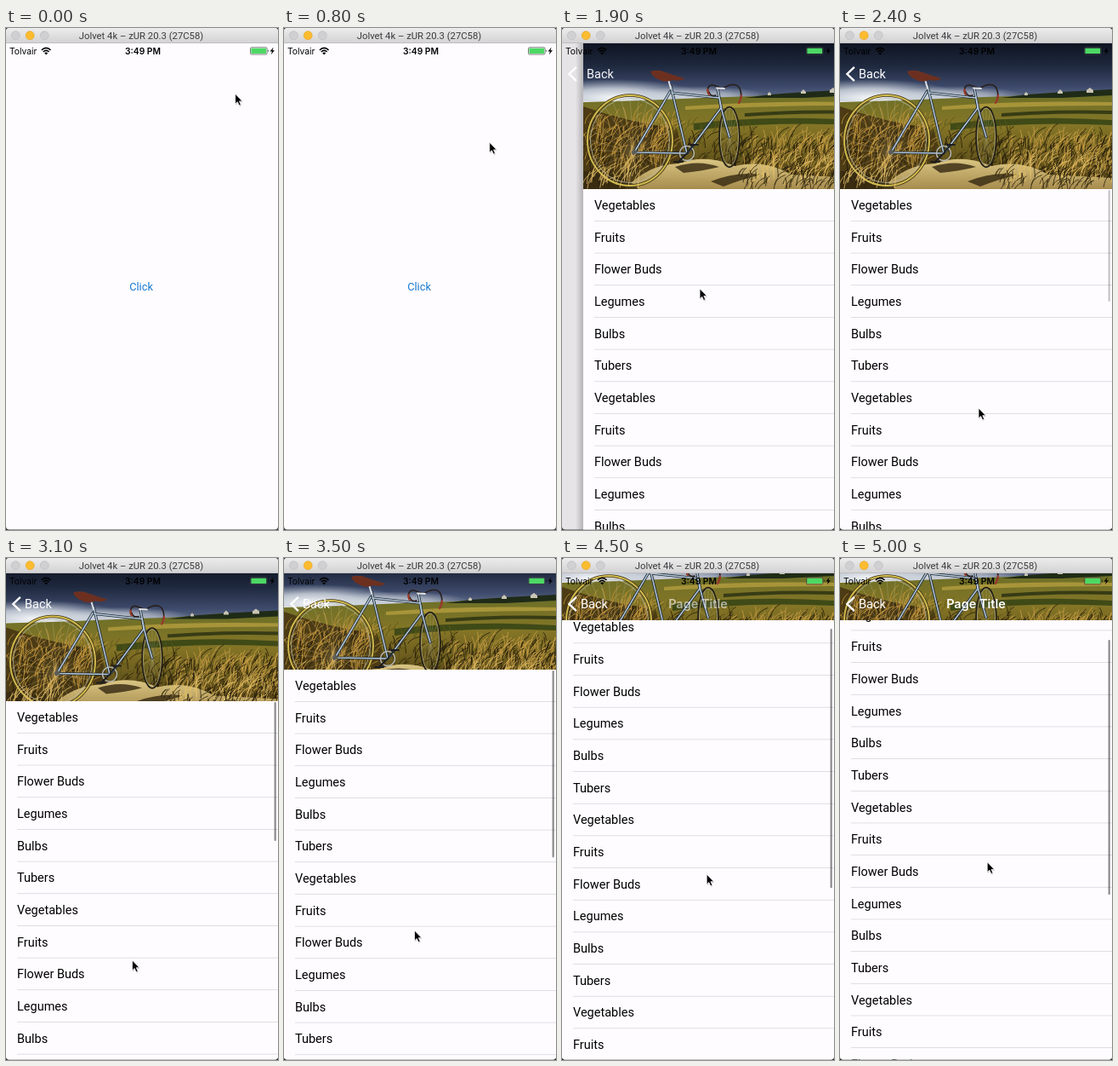
Write an HTML page that moves like this. It is 320 px wide and 589 px high and loops after 5100 ms.

```html
<!DOCTYPE html>
<html lang="en">
<head>
<meta charset="utf-8">
<title>Scrolling header</title>
<style>
  html, body { margin: 0; width: 100%; height: 100%; overflow: hidden; background: #3a393c; }
  svg { display: block; }
  text { font-family: Roboto, sans-serif; font-size: 14.5px; }
  .bar { font-family: Inter, sans-serif; font-size: 10.3px; }
  .bold { font-family: Inter, sans-serif; font-weight: 600; }
  .mid { text-anchor: middle; }
  .line { fill: none; stroke-linecap: round; stroke-linejoin: round; }
</style>
</head>
<body>
<svg id="stage" width="320" height="589" viewBox="0 0 320 589">
  <defs>
    <linearGradient id="chrome" x2="0" y2="1"><stop stop-color="#ececec"/><stop offset="1" stop-color="#d2d1d3"/></linearGradient>
    <linearGradient id="edge"><stop stop-color="#000" stop-opacity="0"/><stop offset="1" stop-color="#000" stop-opacity=".22"/></linearGradient>
    <linearGradient id="sky" x2="0" y2="1"><stop stop-color="#0e1421"/><stop offset=".4" stop-color="#1f293f"/><stop offset=".75" stop-color="#3d496a"/><stop offset="1" stop-color="#65718f"/></linearGradient>
    <radialGradient id="glow"><stop stop-color="#f6f8fa"/><stop offset=".5" stop-color="#dfe5ea" stop-opacity=".75"/><stop offset="1" stop-color="#c3ced8" stop-opacity="0"/></radialGradient>
    <linearGradient id="field" x2="0" y2="1"><stop stop-color="#6b6f28"/><stop offset=".35" stop-color="#847526"/><stop offset="1" stop-color="#4a3813"/></linearGradient>
    <linearGradient id="stone" x2="0" y2="1"><stop stop-color="#dac583"/><stop offset="1" stop-color="#a58a4c"/></linearGradient>
    <clipPath id="window"><rect width="320" height="588.4" rx="4"/></clipPath>
  </defs>
  <g clip-path="url(#window)">
    <rect width="320" height="589" fill="#fefcff"/>
    <g id="home">
      <text id="click" class="mid" x="159" y="307.7" fill="#1679d0" style="font-size:12.8px">Click</text>
    </g>
    <rect id="dim" y="18" width="320" height="571" opacity="0"/>
    <g id="page">
      <rect x="-9" y="18" width="9" height="571" fill="url(#edge)"/>
      <rect y="18" width="320" height="571" fill="#fefcff"/>
      <g id="list"></g>
      <svg id="header" y="18" width="320" height="171" overflow="hidden">
        <g id="photo">
          <rect y="18" width="320" height="68" fill="url(#sky)"/>
          <ellipse cx="35" cy="82" rx="110" ry="22" fill="url(#glow)"/>
          <ellipse cx="135" cy="81" rx="85" ry="13" fill="url(#glow)" opacity=".7"/>
          <path d="M0 87L70 85L140 82L200 80L250 76L320 74V190H0Z" fill="url(#field)"/>
          <path d="M190 82L220 78L262 75L320 72V79L260 82Z" fill="#1f2b17"/>
          <path d="M217 77l2-2 2 2v2h-4zM256 75l3-3 3 3v2h-6zM290 73l4-3 4 3v3h-8z" fill="#c9c5b4"/>
          <path d="M120 92Q210 85 320 87V91Q210 91 120 96Z" fill="#a8953a"/>
          <path d="M190 100Q260 95 320 97V101Q260 99 190 104Z" fill="#373c14"/>
          <path d="M130 112Q220 102 320 108V114Q220 109 130 120Z" fill="#3f4a17"/>
          <path d="M0 92Q50 110 110 118L130 190H0Z" fill="#4c3b14"/>
          <g id="backGrass"></g>
          <path d="M48 190Q75 160 112 159Q145 147 178 162Q215 154 245 172L320 176V190Z" fill="url(#stone)"/>
          <path d="M0 190V168Q24 166 48 178Q60 182 66 190ZM108 163Q135 154 160 163Q140 168 118 170ZM150 180Q180 168 210 172Q185 178 165 186Z" fill="#352811" opacity=".8"/>
          <g class="line">
            <ellipse cx="55" cy="132" rx="50" ry="53" stroke="#3c3315" stroke-width="3.6"/>
            <ellipse cx="55" cy="132" rx="50" ry="53" stroke="#d3bb4e" stroke-width="1.9"/>
            <ellipse cx="55" cy="132" rx="46.5" ry="49.5" stroke="#bcbba8" stroke-width=".8"/>
            <ellipse cx="172" cy="128" rx="11.5" ry="35" stroke="#211d15" stroke-width="2.4"/>
            <ellipse cx="172" cy="128" rx="10.5" ry="34" stroke="#b9ad74" stroke-width=".9"/>
            <path id="spokes" stroke="#e3dfc7" stroke-width=".35" opacity=".55"/>
            <g id="frame">
              <path d="M102 75L60 146L122 147L103 68M104 76L160 82L162 94L124 145M158 71L163 96Q167 112 172 128"/>
            </g>
            <path d="M100 60L103 71" stroke="#d9dde1" stroke-width="2"/>
            <path d="M147 77Q145 66 153 67L164 71Q177 63 183 69Q188 76 184 87M148 75Q150 81 156 79" stroke="#29201f" stroke-width="1.7"/>
            <path d="M146.5 72Q146 76 148 78M186 79Q186 84 183 88" stroke="#9c3a2a" stroke-width="2.2"/>
            <path d="M157 70.5L166 71" stroke="#dfe3e6" stroke-width="1.8"/>
            <circle cx="122" cy="147" r="8.5" stroke="#b5b8b6" stroke-width="1.5"/>
            <path d="M122 147L112 157M107 157H117M122 147L130 137M126 137H135" stroke="#1c1e20" stroke-width="1.8"/>
            <circle cx="60" cy="146" r="3" fill="#5c5d58"/>
          </g>
          <path d="M79 51Q88 48 97 52Q108 56 119 59Q115 63 105 61Q96 65 88 60Q81 57 79 51Z" fill="#6d3020"/>
          <g id="frontGrass"></g>
        </g>
      </svg>
    </g>

    <g id="status">
      <text class="bar" x="4" y="30.7">Tolvair</text>
      <g class="line" stroke="#000" stroke-width="1.6" style="stroke-linecap:butt">
        <path d="M41.9 25.8Q47.2 20.8 52.5 25.8M43.8 28Q47.2 24.9 50.6 28"/>
      </g>
      <path d="M45.2 29.2Q47.2 27.6 49.2 29.2L47.2 31.4Z"/>
      <text class="bar bold mid" x="161" y="30.7">3:49 PM</text>
      <rect x="287.5" y="22.8" width="19.6" height="8.2" rx="1.4" fill="none" stroke="#444" stroke-width=".7"/>
      <rect x="288.4" y="23.7" width="17.8" height="6.4" rx=".7" fill="#4cd964"/>
      <path d="M308 25.3Q309.4 26.9 308 28.5Z"/>
      <path d="M314.6 22.6L310.6 27.5H313L311.8 31.2L316 26.2H313.5Z"/>
    </g>

    <g id="back" opacity="0">
      <path class="line" d="M16 46.7L8.4 54L16 61.3" stroke="#fff" stroke-width="2.4" style="stroke-linecap:square;stroke-linejoin:miter"/>
      <text id="backText" x="22" y="59.2" fill="#fff">Back</text>
    </g>
    <text id="pageTitle" class="bold mid" x="160" y="59.2" fill="#fff" opacity="0">Page Title</text>
    <rect id="thumb" x="315.6" width="2.2" rx="1.1" opacity="0"/>

    <rect width="320" height="18" fill="url(#chrome)"/>
    <rect y="17.4" width="320" height=".6" fill="#b4b2b5"/>
    <g stroke-width=".6">
      <circle cx="11.3" cy="8.7" r="5" fill="#d0cfd1" stroke="#bbb9bc"/>
      <circle cx="28.2" cy="8.7" r="5" fill="#fdbc2f" stroke="#dfa023"/>
      <circle cx="45.3" cy="8.7" r="5" fill="#d0cfd1" stroke="#bbb9bc"/>
    </g>
    <text class="mid" x="159" y="13" fill="#3b3a3c" style="font-size:11.3px">Jolvet 4k – zUR 20.3 (27C58)</text>
  </g>
  <g id="cursor">
    <path d="M.6 1.6V13.2L3.3 10.8L5.2 15L7.2 14L5.3 10H9Z" opacity=".2"/>
    <path d="M0 0V11.9L2.7 9.5L4.6 13.7L6.7 12.8L4.8 8.7H8.5Z" stroke="#fff" stroke-width=".8"/>
  </g>
</svg>
<script>
const $ = id => document.getElementById(id);
const set = (id, attrs) => {
  for (const key in attrs) $(id).setAttribute(key, attrs[key]);
};
const move = (id, x, y) => set(id, { transform: `translate(${x} ${y})` });
const clamp = v => Math.max(0, Math.min(1, v));
const ramp = (t, from, to) => clamp((t - from) / (to - from));

const LOOP = 5100, STEP = 100;
const ROW = 37.67, TOP = 189, FOLD = 116;
const FOODS = ['Vegetables', 'Fruits', 'Flower Buds', 'Legumes', 'Bulbs', 'Tubers'];

// [time, value] keys
const SCROLL = [[2800, 0], [3100, 21], [3500, 58], [4000, 97.5], [5000, 141.5]];
const CURSOR_X = [[600, 269.7], [1200, 162], [1800, 162], [2400, 163], [2800, 149], [3100, 148.5], [3500, 153.5], [4000, 164], [5000, 173.2]];
const CURSOR_Y = [[600, 77.2], [1200, 297], [1800, 297], [2400, 446], [2800, 493], [3100, 472], [3500, 437], [4000, 399], [5000, 356.7]];

// Monotone cubic through the keys, at rest outside them
function track(keys, t) {
  const last = keys.length - 1;
  if (t <= keys[0][0]) return keys[0][1];
  if (t >= keys[last][0]) return keys[last][1];
  const slope = i => (keys[i + 1][1] - keys[i][1]) / (keys[i + 1][0] - keys[i][0]);
  const tangent = i => {
    if (i === 0 || i === last) return 0;
    const a = slope(i - 1), b = slope(i);
    return a * b > 0 ? 2 * a * b / (a + b) : 0;
  };
  let i = 0;
  while (t > keys[i + 1][0]) i++;
  const [t0, v0] = keys[i], [t1, v1] = keys[i + 1];
  const d = t1 - t0, u = (t - t0) / d, w = 1 - u;
  return v0 * w * w * (1 + 2 * u) + v1 * u * u * (3 - 2 * u)
    + d * u * w * (tangent(i) * w - tangent(i + 1) * u);
}

let seed = 17;
function random() {
  seed = (seed * 16807) % 2147483647;
  return seed / 2147483647;
}

function grass(id, color, count, x, width, y, height, length) {
  let d = '';
  for (let i = 0; i < count; i++) {
    const px = x + random() * width, py = y + random() * height;
    const lean = (random() - .2) * length, rise = length * (.4 + random() * .5);
    d += `M${px.toFixed(1)} ${py.toFixed(1)}q${(lean * .2).toFixed(1)} ${(-rise * .7).toFixed(1)} ${lean.toFixed(1)} ${(-rise).toFixed(1)}`;
  }
  $(id).innerHTML += `<path class="line" d="${d}" stroke="${color}" stroke-width=".8"/>`;
}

function build() {
  $('list').innerHTML = Array.from({ length: 16 }, (_, i) => {
    const y = TOP + i * ROW;
    return `<text x="13" y="${y + 24}">${FOODS[i % FOODS.length]}</text>
      <rect x="13" y="${y + ROW - .6}" width="307" height=".7" fill="#d3d1d6"/>`;
  }).join('');

  grass('backGrass', '#241a08', 230, -5, 330, 125, 65, 18);
  grass('backGrass', '#c2963c', 170, -5, 110, 108, 60, 22);
  grass('backGrass', '#c79e45', 190, 190, 130, 130, 50, 20);
  grass('backGrass', '#5b5519', 90, 90, 110, 112, 48, 13);
  grass('backGrass', '#1d1608', 90, 170, 150, 135, 45, 16);
  grass('frontGrass', '#e0bd68', 35, -5, 75, 165, 25, 26);
  grass('frontGrass', '#e2bf66', 70, 195, 125, 155, 32, 20);
  grass('frontGrass', '#2c220c', 70, 180, 145, 172, 20, 16);

  let spokes = '';
  for (let i = 0; i < 28; i++) {
    const a = i * Math.PI / 14, c = Math.cos(a), s = Math.sin(a);
    spokes += `M60 146L${55 + 46 * c} ${132 + 49 * s}`;
    if (i % 2) spokes += `M172 128L${172 + 10 * c} ${128 + 33 * s}`;
  }
  set('spokes', { d: spokes });

  const tubes = $('frame').firstElementChild;
  const shine = tubes.cloneNode();
  tubes.setAttribute('stroke', '#1d2935');
  tubes.setAttribute('stroke-width', 3.2);
  shine.setAttribute('stroke', '#b4c6d6');
  shine.setAttribute('stroke-width', 1.5);
  $('frame').append(shine);
}

function push(t) {
  const k = Math.max(0, t - 1600) * .014;
  return t >= 2200 ? 1 : 1 - Math.exp(-k) * (1 + k);
}

function render(t) {
  const p = push(t), scroll = track(SCROLL, t);
  const height = TOP - 18 - Math.min(scroll, FOLD);

  move('home', -96 * p, 0);
  set('click', { opacity: t < 1500 ? 1 : .2 + .8 * ramp(t, 1600, 2000) });
  set('dim', { opacity: .1 * p });
  move('page', 320 * (1 - p), 0);
  set('page', { visibility: t < 1600 ? 'hidden' : 'visible' });

  move('list', 0, -scroll);
  set('header', { height });
  move('photo', 0, -18 - (TOP - 18 - height) / 2);

  set('back', { opacity: ramp(p, .2, .95) });
  set('backText', { x: 22 + 90 * (1 - p) });
  set('pageTitle', { opacity: ramp(scroll, 108, 140) });

  const top = scroll < FOLD ? TOP - scroll : TOP - FOLD + (scroll - FOLD) * .86;
  const bottom = 321 + scroll * .524;
  const shown = t < 2750
    ? ramp(t, 2000, 2100) * (1 - ramp(t, 2200, 2600))
    : ramp(t, 2750, 2900);
  set('thumb', { y: top + 1, height: bottom - top - 1, opacity: .45 * shown });

  move('cursor', track(CURSOR_X, t), track(CURSOR_Y, t));
}

build();
const start = performance.now();
function tick() {
  const t = (performance.now() - start) % LOOP;
  render(Math.floor(t / STEP) * STEP);
  requestAnimationFrame(tick);
}
tick();
</script>
</body>
</html>
```
